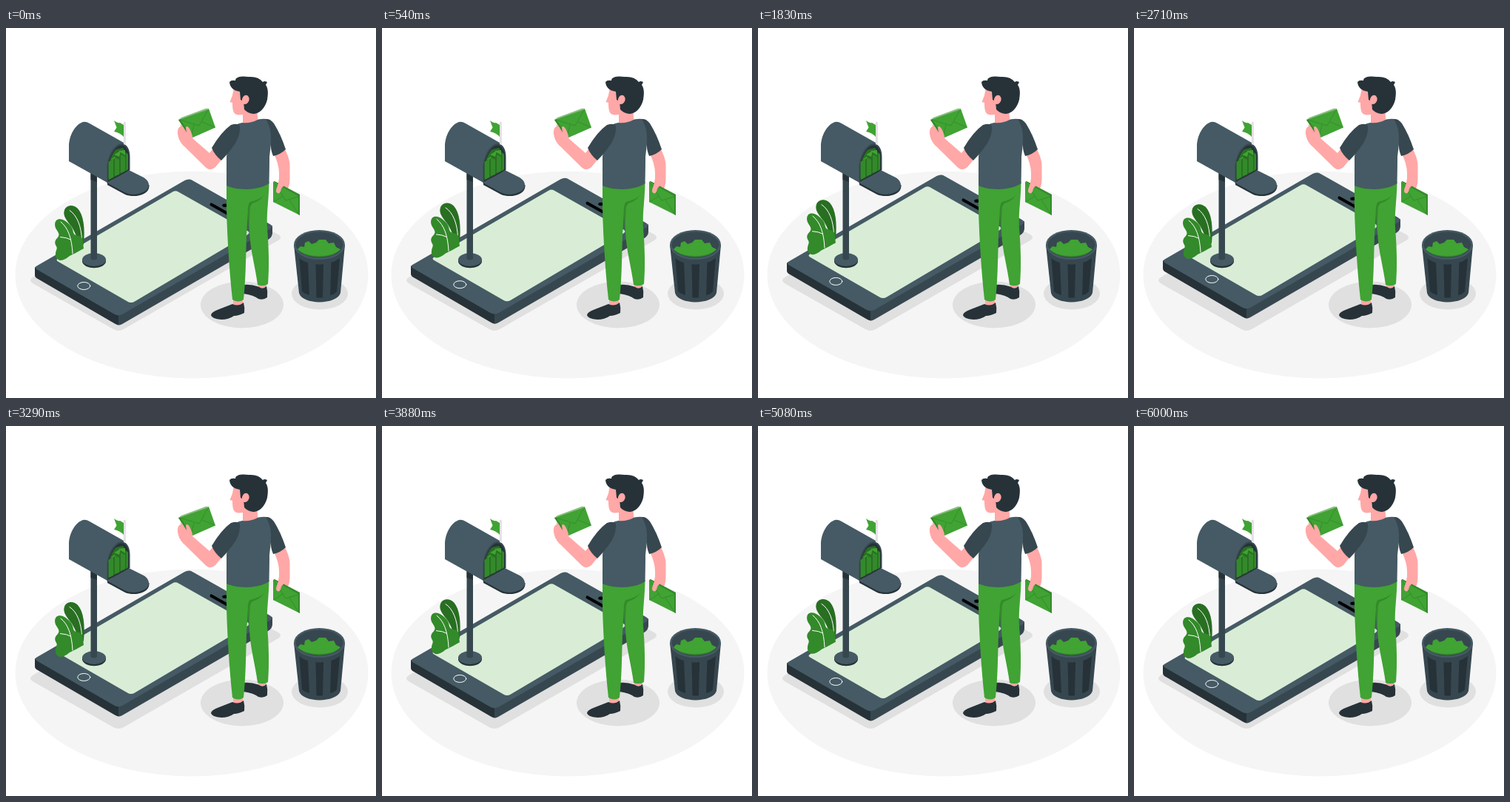
An HTML page that plays this animation: 500 by 500 pixels, repeating every 6.04 s.

```html
<!DOCTYPE html>
<html lang="en">
<head>
<meta charset="utf-8">
<title>Mailbox</title>
<style>
  html, body { margin: 0; width: 100%; height: 100%; overflow: hidden; background: #fff; }
  svg { display: block; width: 100%; height: 100%; }
  .floor { fill: #f5f5f5; }
  .shade { fill: #e0e0e0; }
  .light { fill: #455a64; }
  .mid { fill: #37474f; }
  .dark { fill: #263238; }
  .green { fill: #40a333; }
  .moss { fill: #338a2a; }
  .deep { fill: #286f22; }
  .skin { fill: #ffa8a7; }
  .line { fill: none; stroke-linecap: round; stroke-linejoin: round; }
  .white { stroke: #fff; }
  .fold { stroke: #338a2a; stroke-width: .8; }
</style>
</head>
<body>
<svg viewBox="0 0 500 500">
  <ellipse class="floor" cx="251" cy="333.5" rx="238.500" ry="140"/>
  <path class="shade" d="M36 337 L240 219 Q246 216 252 219 L368 279 Q374 283 368 287 L159 407 Q152 411 145 407 L36 345 Q30 341 36 337Z"/>
  <ellipse class="shade" cx="319" cy="374" rx="56" ry="31.500"/>
  <ellipse class="shade" cx="424" cy="359" rx="38" ry="21.500"/>

  <g id="phone">
    <path class="dark" d="M39 323 V334 Q39 337 43 339 L147 399.500 Q150 401.500 153 401.500 V386Z"/>
    <path class="mid" d="M152 386 V401.500 Q155 401.500 158 399.500 L355 285.500 Q360 282 360 277 V267Z"/>
    <path class="light" d="M42 321.300 L241 206.300 Q247 203 252 206 L357 265.300 Q362 268.500 357 271.500 L158 386.500 Q152 390 146 386.500 L42 326.500 Q37 323.800 42 321.300Z"/>
    <path fill="#d9edd6" d="M71 311 L225 221.500 Q229 219 233 221.500 L326 274 Q331 276.500 326 279.500 L174 369.500 Q169 372.500 164 369.500 L71 316 Q66 313.500 71 311Z"/>
    <path class="line" stroke="#000" stroke-width="4" d="M277.500 238.500 L306 254.500"/>
    <ellipse cx="296" cy="239.800" rx="3.800" ry="2.200"/>
    <ellipse class="line white" cx="105.300" cy="348.500" rx="8.500" ry="5"/>
  </g>

  <g id="plant">
    <path class="deep" d="M102 296 C97 288 95 279 89 269 C83 261 76 254 79 246 C82 239 91 238 97 244 C105 253 107 271 105 292Z"/>
    <path class="line white" d="M86 246.500 C96 253 102 268 102.500 287"/>
    <path class="moss" d="M73 314 C69 313 66 309 67 305 C67 300 70 299 68 295 C65 290 66 287 70 283 C73 279 71 277 68 272 C65 267 66 262 68 260 C71 257 78 258 83 263 C88 267 90 270 91 276 C92 281 97 280 101 282 C105 285 104 292 105 298 C98 302 92 305 86 308 Q79 314 73 314Z"/>
    <path class="line white" d="M74 262 C84 270 89 284 90 305 M73.500 282.500 Q82 283 87.500 286"/>
  </g>

  <g id="mailbox">
    <path class="dark" d="M103 313 V316 C106 327 132 327 135 316 V313Z"/>
    <ellipse class="light" cx="119" cy="313" rx="16" ry="9"/>
    <path class="mid" d="M114.500 196 H123 V312 Q119 315 114.500 312Z"/>
    <path class="dark" d="M114.500 196 L123 201 V208 L114.500 205Z"/>
    <path class="light" d="M85 180 V160 C85 145 94 130 104 127 Q108 126 113 129 L160 155.500 L137 209Z"/>
    <path class="mid" d="M136.500 209 V188 C137 172 147 156 157 156 C164 157 167.500 165 167.500 174 V192Z"/>
    <path class="dark" d="M138 207 V188 C139 174 148 158.500 156 158.500 C162 158.500 166 166 166 175 V192Z"/>
    <path class="deep" d="M139 205 V187 C140 177 145 167 149 164 L158 162 L164 172 V192Z"/>
    <path class="moss" d="M138.500 205 V181 L145 177 V202Z M147 200 V175 L153 178 V198Z M155 196 V171 L161 174 V193Z M162.500 193 V168 L165 171 V191Z"/>
    <path class="green" d="M141 178 L148 173 L146 177Z M146 171 L155 166 L153 174Z M152 166 L161 165 L161 172Z"/>
    <path class="dark" d="M137 209 V212 L161 225 C173 230 193 226 193.500 214 V212Z"/>
    <path class="light" d="M137 209.500 L166 192 L186 202 C196 208 195 218 185 222 C177 226 168 226 160 222Z"/>
    <path class="line" stroke="#263238" d="M137 209 L166 192"/>
    <path class="line" stroke="#e0e0e0" stroke-width="3" stroke-linecap="butt" d="M160.300 128 V156"/>
    <path class="green" d="M146 125 Q150 129 154 128 L159 131 V147 Q154 141.500 146 140 L149.500 134.500Z"/>
  </g>

  <g id="bin">
    <path class="mid" d="M389 293 L396 358 C400 374.500 447 374.500 452 358 L458 293Z"/>
    <path class="dark" d="M396.500 311 Q402 316 408 317 L410 361 Q403 359 400 356Z M418.500 319 Q424 320 429 319 L428 364 Q424 365 419.500 364Z M439.500 317 Q446 315 451 311 L447 356 Q444 360 438 361Z"/>
    <ellipse class="light" cx="423.500" cy="293" rx="34.500" ry="20"/>
    <ellipse class="mid" cx="423.500" cy="293" rx="32" ry="17.500"/>
    <path class="moss" d="M394 299 C406 313 441 313 452 299Z"/>
    <path class="green" d="M394 299 L398 295 L403 296 L404 290 L409 288 L413 292 L419 290 L423 286 L432 286 L436 291 L443 290 L446 296 L452 299 C441 311 406 311 394 299Z"/>
  </g>

  <g id="person">
    <path class="skin" d="M341 341 H352 V354 H341Z M307 361 H320 V377 H307Z"/>
    <path class="dark" d="M321 347 Q331 346 341 349.500 Q347 354 352 349 Q354 356 353 364 Q348 368 341 366 Q335 361 321 359Z"/>
    <path class="dark" d="M306 373 Q314 377 321 371 Q323 378 322 385 Q314 389 308 389 Q301 394 291 394 Q278 393 277 388 Q277 384 288 380Z"/>
    <path class="green" d="M298 208 H355.500 C355 235 352 248 353 270 C355 295 356 322 354 346 Q348 350 340 347 C337 323 330 300 329 276 L327 247 L325 280 C324 315 324 340 321 367 Q314 372 306 367 C302 330 299 285 298 245Z"/>
    <path class="moss" d="M327 250 Q326 238 330 235 Q343 232 349 226 Q343 234 333 237 Q329 240 329.500 250 L328 276Z"/>

    <path class="skin" d="M361 168 L377 164 C383 176 384 183 383.500 190 V206 Q383 215 379 221 L367 212 Q370 204 369 196 Q369 184 361 168Z"/>
    <path class="green" d="M361 208 L397 226.500 V253 L361 235Z"/>
    <path class="moss" d="M361 208 L363 207 L397 225 V253 L395 252 V227Z"/>
    <path class="line fold" d="M362 209 L378 233 L395 228 M362 235 L374 227 M395 251 L383 232"/>
    <path class="skin" d="M369 198 C370 210 365 215 365 221 Q368 226 371 221 Q372 215 377 212 L380 200Z"/>

    <path class="skin" d="M282 160 L292 177 L283 188 Q276 194 270 188.500 L241 160 C235 155 231 145 232 139 Q233 132 238 133 L252 149 L275 169Z"/>
    <path class="green" d="M233 124 L274 109 L283 134.500 L250 149Z"/>
    <path fill="#86bd7c" d="M233 124 L237 121 L271 108.500 L274 110Z"/>
    <path class="moss" d="M233 124 L235.500 124 L252 148 L249 149Z"/>
    <path class="line fold" d="M235 124 L261 132 L273 111 M250 148 L254 131 M282 134 L265 127"/>
    <path class="skin" d="M236 130 Q240 134 244 142 L243 134 Q245 131 248 136 Q253 145 252 151 L245 158 L234 151Z"/>

    <path class="skin" d="M308 80 L306 91 L302.500 100 L306 101 C306 111 307 117 314 117.500 L320 117 V132 H341 L339 108 L330 84Z"/>
    <path class="light" d="M319 128 Q330 129.500 341 123.500 Q350 122 357 124 C361 142 358 155 356 174 Q356 190 355.500 210 C341 220 313 220 298 213 V174 L302 140 Q309 129 319 128Z"/>
    <path class="mid" d="M304 131 Q313 128 316 132 Q317 142 311 154 Q302 168 291 179 Q282 172 278 162 Q291 140 304 131Z"/>
    <path class="mid" d="M351 123 Q358 123 362 129 Q371 143 378 164 Q371 171 361 173 Q357 164 358 153 Q359 135 351 123Z"/>

    <path class="dark" d="M302 73 Q304 70 310 71 C310 65 321 65 328 66 Q341 65 347 73 Q349 71 353 73 L351 77 C355 82 354 91 353 97 C350 109 342 116 334 116 Q326 115 322 110 L321 99 L317 97 L316 86 Q303 84 302 73Z"/>
    <path class="skin" d="M319 96 Q321 90 326 91 Q330 94 328 99 Q325 105 319 102Z"/>
  </g>
</svg>
<script>
  const LOOP = 6040, CYCLE = 6000, LIFT = 10;
  const phone = document.getElementById('phone');
  const plant = document.getElementById('plant');

  // Linear rise and fall, one bob per period.
  function bob(part, t, period) {
    const p = (t % period) / period;
    const y = -LIFT * (1 - Math.abs(1 - 2 * p));
    part.setAttribute('transform', `translate(0 ${y.toFixed(3)})`);
  }

  function draw() {
    const t = Math.min(performance.now() % LOOP, CYCLE);
    bob(phone, t, CYCLE);
    bob(plant, t, CYCLE / 2);
    requestAnimationFrame(draw);
  }
  draw();
</script>
</body>
</html>
```
